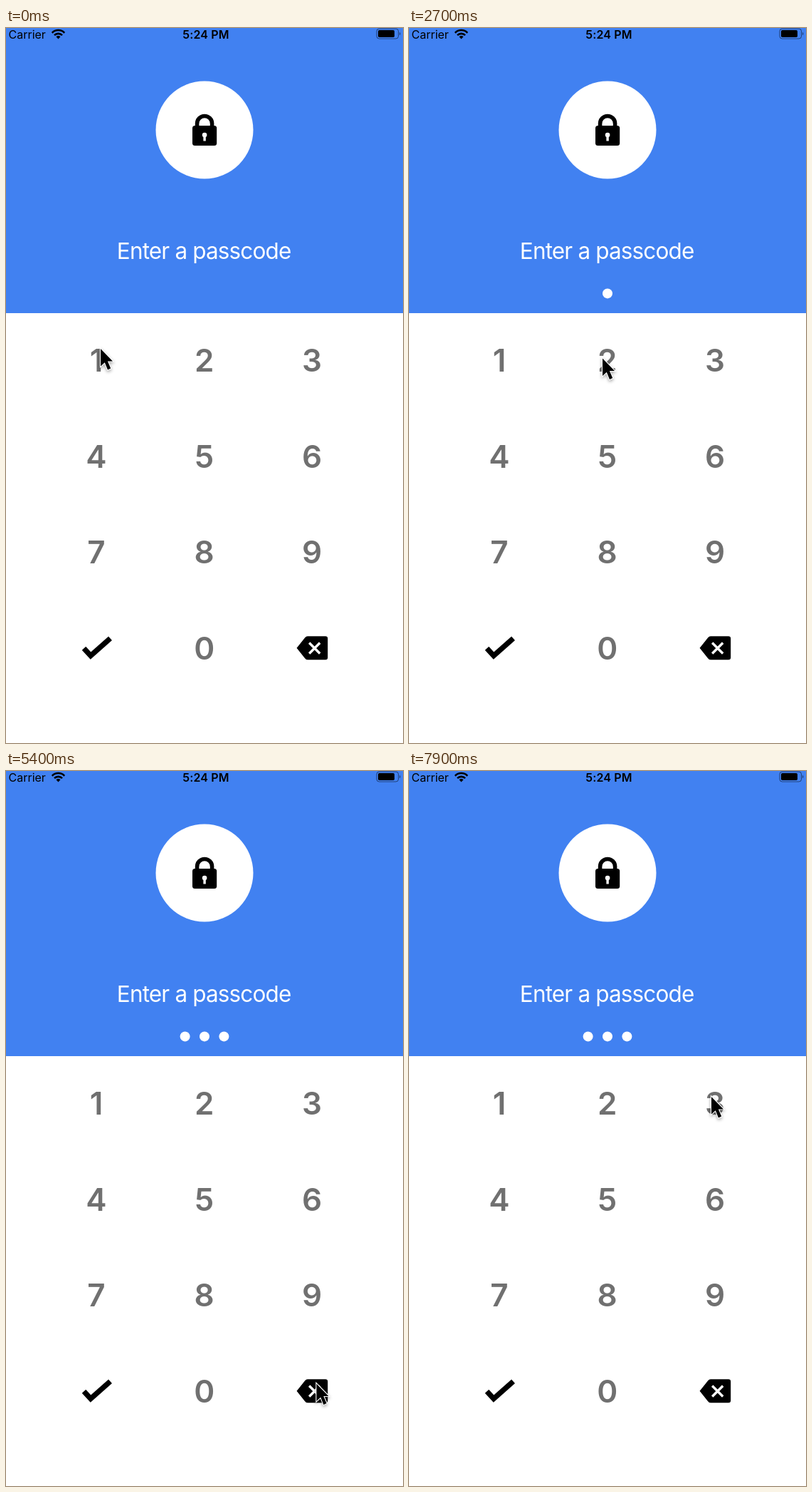
Recreate the animation shown at these times as an HTML page. Size 558 px wide and 1003 px high, loop 8000 ms.

```html
<!DOCTYPE html>
<html lang="en">
<head>
<meta charset="utf-8">
<title>Passcode</title>
<style>
html, body { margin: 0; width: 100%; height: 100%; overflow: hidden; background: #fff; }
svg { display: block; width: 100vw; height: 100vh; }
text { font-family: Inter, Roboto, sans-serif; }
.status { font-size: 16px; }
.clock { font-size: 16px; font-weight: 600; letter-spacing: .15px; text-anchor: middle; }
.prompt { font-size: 31.5px; letter-spacing: -.85px; fill: #fff; text-anchor: middle; }
.key { font-size: 44px; font-weight: 600; fill: #707070; text-anchor: middle; }
#cursor { filter: drop-shadow(0 2px 2px rgba(0,0,0,.35)); }
</style>
</head>
<body>
<svg viewBox="0 0 558 1003" preserveAspectRatio="none">
  <defs><clipPath id="cell"><rect id="cellBox" width="88" height="88"/></clipPath></defs>
  <rect width="558" height="400" fill="#4181f1"/>

  <text class="status" x="3.5" y="14.5">Carrier</text>
  <g fill="none" stroke="#000" stroke-width="2.6">
    <path d="M64.8 6.8a12 12 0 0 1 17.4 0M68 10.2a7.6 7.6 0 0 1 11 0"/>
    <path d="M73.5 15.4l-3-3.1a4.2 4.2 0 0 1 6 0z" fill="#000" stroke="none"/>
  </g>
  <text class="clock" x="281" y="14.5">5:24 PM</text>
  <rect x="521" y="1" width="30.5" height="14" rx="3.5" fill="none" stroke="#000" stroke-opacity=".5"/>
  <rect x="523" y="3" width="23" height="10" rx="1.8"/>
  <path d="M553 5.5q2.6 2.5 0 5z" fill-opacity=".55"/>

  <circle cx="279" cy="143" r="68.5" fill="#fff"/>
  <path d="M268.6 139v-5a10.5 10.5 0 0 1 21 0v5" fill="none" stroke="#000" stroke-width="5.6"/>
  <rect x="262" y="137" width="34.2" height="28" rx="3.5"/>
  <path d="M277.4 151h3.4v7.5h-3.4z" fill="#fff"/>
  <circle cx="279.1" cy="150" r="3.3" fill="#fff"/>

  <text class="prompt" x="278.2" y="324">Enter a passcode</text>
  <g id="dots" fill="#fff"></g>

  <g id="keys"></g>
  <path d="M109.5 870.3L119 880.6L146.5 856.3" fill="none" stroke="#000" stroke-width="7.4"/>
  <path d="M424 853.3H449q3.2 0 3.2 3.2V883q0 3.2-3.2 3.2H424q-2.6 0-4-2.2L408.6 869.8L420 855.5q1.6-2.2 4-2.2z"/>
  <path d="M426.2 862.5l15 15m0-15l-15 15" stroke="#fff" stroke-width="3.4"/>

  <g clip-path="url(#cell)"><circle id="ripple"/></g>
  <path id="cursor" d="M0 0V24.5L5.8 19.2L10 29.5L14.2 27.6L9.9 17.5H17Z" stroke="#fff" stroke-width="2.2" paint-order="stroke"/>
</svg>
<script>
const LOOP = 8000, STEP = 100;
const NS = 'http://www.w3.org/2000/svg';
const $ = id => document.getElementById(id);
const cols = [127, 278.7, 430], rows = [466.5, 601, 735.5, 870];

const ease = {
  hold: () => 0,
  lin: p => p,
  in: p => p * p,
  out: p => 1 - (1 - p) * (1 - p),
  both: p => p * p * (3 - 2 * p)
};

// time, x, y, easing towards the next stop
const path = [
  [0, 133, 450, 'both'],
  [200, 135, 467, 'hold'],
  [1720, 135, 467, 'both'],
  [2550, 272, 463.5, 'hold'],
  [3180, 272, 463.5, 'both'],
  [3700, 427, 467, 'hold'],
  [4400, 427, 467, 'in'],
  [4600, 435, 527, 'lin'],
  [4900, 455, 735, 'out'],
  [5250, 437, 860, 'lin'],
  [5500, 436, 859, 'hold'],
  [6100, 436, 859, 'in'],
  [6280, 440, 770, 'lin'],
  [6500, 431, 515, 'out'],
  [6900, 427, 458, 'hold'],
  [7700, 427, 458, 'lin'],
  [7900, 425, 457, 'hold'],
  [LOOP, 425, 457, 'hold']
];

// start, column, row, change in the number of dots
const taps = [
  [1030, 0, 0, 1],
  [2750, 1, 0, 1],
  [3850, 2, 0, 1],
  [5625, 2, 3, -1],
  [7050, 2, 0, 1]
];
const RIPPLE = 450, DOT_DELAY = 220, RADIUS = 68, OPACITY = .35;

function add(parent, tag, attrs) {
  const el = document.createElementNS(NS, tag);
  set(el, attrs);
  return parent.appendChild(el);
}

function set(el, attrs) {
  for (const k in attrs) el.setAttribute(k, attrs[k]);
}

function cursorAt(t) {
  let i = 0;
  while (i < path.length - 2 && t >= path[i + 1][0]) i++;
  const [t0, x0, y0, kind] = path[i], [t1, x1, y1] = path[i + 1];
  const p = ease[kind]((t - t0) / (t1 - t0));
  return [x0 + (x1 - x0) * p, y0 + (y1 - y0) * p];
}

for (let n = 0; n < 10; n++) {
  const col = n ? (n - 1) % 3 : 1, row = n ? Math.floor((n - 1) / 3) : 3;
  add($('keys'), 'text', { class: 'key', x: cols[col], y: rows[row] + 15.8 }).textContent = n;
}
const dots = [0, 1, 2].map(() => add($('dots'), 'circle', { cy: 372.4, r: 7 }));

function draw(t) {
  const [x, y] = cursorAt(t);
  set($('cursor'), { transform: `translate(${x} ${y})` });

  let count = 0, radius = 0;
  for (const [start, col, row, change] of taps) {
    if (t >= start + DOT_DELAY) count += change;
    const p = (t - start) / RIPPLE;
    if (p < 0 || p >= 1) continue;
    const [cx, cy] = cursorAt(start);
    radius = RADIUS * p;
    set($('cellBox'), { x: cols[col] - 44, y: rows[row] - 44 });
    set($('ripple'), { cx: cx - 1, cy: cy + 3, 'fill-opacity': OPACITY * (1 - p) });
  }
  set($('ripple'), { r: radius });

  dots.forEach((dot, i) => set(dot, {
    cx: 279 + (i - (count - 1) / 2) * 27.4,
    visibility: i < count ? 'visible' : 'hidden'
  }));
}

const begin = performance.now();
function tick(now) {
  const t = Math.max(0, now - begin) % LOOP;
  draw(Math.floor(t / STEP) * STEP);
  requestAnimationFrame(tick);
}
draw(0);
requestAnimationFrame(tick);
</script>
</body>
</html>
```
